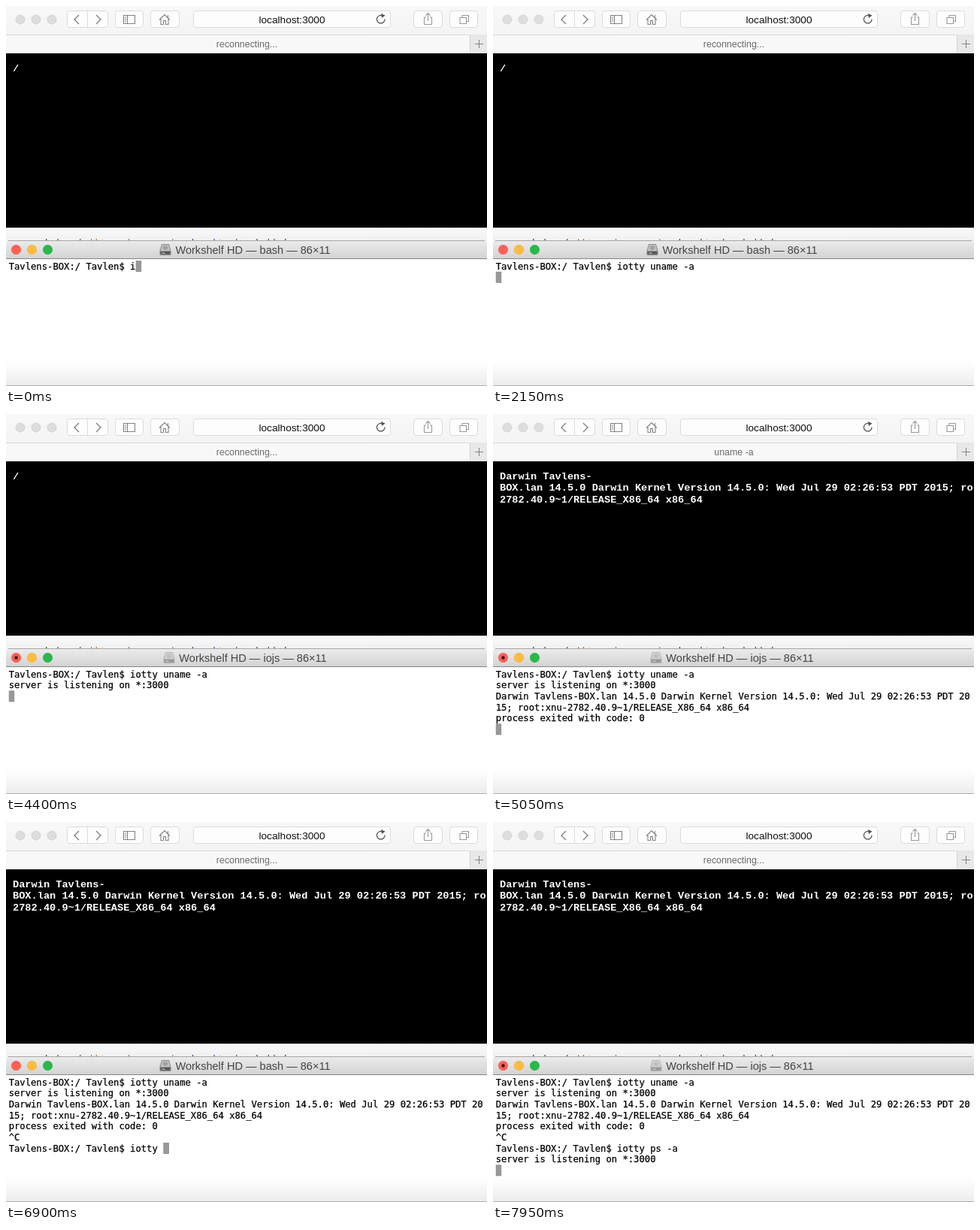
These frames come from a looping animation (640x506 px, 8000 ms). An HTML page:

```html
<!DOCTYPE html>
<html lang="en">
<head>
<meta charset="utf-8">
<title>Terminal in the browser</title>
<style>
html, body { margin: 0; width: 100%; height: 100%; overflow: hidden; background: #fff; }
svg { display: block; width: 640px; height: 506px; }
text { white-space: pre; font-family: "Liberation Sans", Arial, sans-serif; }
.shell text { font: 12.2px "DejaVu Sans Mono", Menlo, monospace; fill: #000; stroke: #000; stroke-width: .25; }
.page text { font: bold 13.64px "Liberation Mono", Courier, monospace; fill: #fff; }
.code text { font: 12px "DejaVu Sans Mono", Menlo, monospace; }
.btn rect { fill: #fdfdfd; stroke: #dcdcdc; }
.line { fill: none; stroke: #828282; stroke-width: 1.1; }
.pale { stroke: #999; }
.dark { stroke: #555; stroke-width: 1.3; }
</style>
</head>
<body>
<svg viewBox="0 0 640 506">
  <defs>
    <linearGradient id="bar" x2="0" y2="1"><stop stop-color="#f8f8f8"/><stop offset="1" stop-color="#f4f4f4"/></linearGradient>
    <linearGradient id="head" x2="0" y2="1"><stop stop-color="#ececec"/><stop offset="1" stop-color="#d2d2d2"/></linearGradient>
    <linearGradient id="strip" x2="0" y2="1"><stop stop-color="#f9f9f9"/><stop offset="1" stop-color="#f0f0f0"/></linearGradient>
    <linearGradient id="foot" x2="0" y2="1"><stop stop-color="#fff"/><stop offset="1" stop-color="#ededed"/></linearGradient>
    <clipPath id="peek"><rect x="0" y="310" width="640" height="2"/></clipPath>
  </defs>

  <!-- browser toolbar -->
  <rect width="640" height="38" fill="url(#bar)"/>
  <g fill="#dedede" stroke="#d3d3d3">
    <circle cx="19" cy="18" r="6"/><circle cx="40" cy="18" r="6"/><circle cx="61" cy="18" r="6"/>
  </g>
  <g class="btn">
    <rect x="81.500" y="6.500" width="54" height="22" rx="3.500"/>
    <rect x="145.500" y="6.500" width="37" height="22" rx="3.500"/>
    <rect x="192.500" y="6.500" width="38" height="22" rx="3.500"/>
    <rect x="249.500" y="6.500" width="262" height="22" rx="3.500"/>
    <rect x="542.500" y="6.500" width="38" height="22" rx="3.500"/>
    <rect x="590.500" y="6.500" width="37" height="22" rx="3.500"/>
  </g>
  <path d="M108.500 7V28" stroke="#dcdcdc"/>
  <g class="line">
    <path d="M97 12L91 18L97 24M120 12L126 18L120 24" stroke-width="1.400"/>
    <path d="M156.500 12.500H171.500V23.500H156.500ZM161.500 12.500V23.500M158 15H160M158 17.500H160M158 20H160"/>
    <path d="M204 18.500L211 11.500L218 18.500M206 17V24.500H209.500V19.500H212.500V24.500H216V17M215.500 12V15.500"/>
    <path class="dark" d="M500.500 12.700A5.300 5.300 0 1 0 504 17.500"/>
    <path class="pale" d="M559 15H556.500V24.500H566.500V15H564M561.500 20V9.500M558.500 12.500L561.500 9.500L564.500 12.500"/>
    <path class="pale" d="M607 15V12.500H615.500V20.500H612.500M604 15.500H612.500V23.500H604Z"/>
  </g>
  <path d="M499 10L504.500 12.500L500 16Z" fill="#555"/>
  <text x="380.500" y="23" font-size="13.650" text-anchor="middle" fill="#111">localhost:3000</text>

  <!-- tab bar -->
  <rect y="38" width="640" height="25" fill="#f8f8f8"/>
  <rect y="38" width="640" height="1" fill="#d8d8d8"/>
  <rect x="617" y="38" width="23" height="25" fill="#e8e8e8"/>
  <path d="M617.500 38V63" stroke="#d3d3d3"/>
  <path class="line" d="M624 50.500H635M629.500 45V56"/>
  <text id="tab" x="320.500" y="55" font-size="12.400" text-anchor="middle" fill="#686868"></text>

  <!-- page -->
  <rect y="63" width="640" height="232" fill="#000"/>
  <g class="page" id="page"></g>

  <!-- window peeking out behind -->
  <rect y="295" width="640" height="18" fill="url(#strip)"/>
  <rect y="295" width="640" height="1" fill="#c8c8c8"/>
  <g class="code" clip-path="url(#peek)">
    <text x="30" y="319" fill="#333">socket.on(</text>
    <text x="110" y="319" fill="#a0642d">'timeout, error'</text>
    <text x="245" y="319" fill="#2525c0">function</text>
    <text x="303" y="319" fill="#333">(socket) {</text>
  </g>

  <!-- terminal window -->
  <path d="M0 337V316Q0 312 4 312H636Q640 312 640 316V337Z" fill="url(#head)"/>
  <path d="M3 312.500H637" stroke="#a6a6a6"/>
  <rect y="336" width="640" height="1" fill="#858585"/>
  <circle cx="13.500" cy="324.500" r="6.200" fill="#fc6157" stroke="#ee544b" stroke-width=".6"/>
  <circle cx="34.500" cy="324.500" r="6.200" fill="#fdbd3e" stroke="#eeae38" stroke-width=".6"/>
  <circle cx="55.500" cy="324.500" r="6.200" fill="#29b84a" stroke="#27ab43" stroke-width=".6"/>
  <circle id="busy" cx="13.500" cy="324.500" r="2.200" fill="#4a0603"/>
  <g id="disk">
    <path d="M2.500 0H12.500L15 9V13.500Q15 15 13.500 15H1.500Q0 15 0 13.500V9Z" fill="#8b8b8b"/>
    <path d="M3.200 1H11.800L13.800 9H1.200Z" fill="#c4c4c4"/>
    <ellipse cx="7.500" cy="5" rx="3.500" ry="3" fill="#a2a2a2"/>
    <path d="M1 10H14V13.500H1Z" fill="#555"/>
    <path d="M3 12H7" stroke="#ddd"/>
  </g>
  <text id="title" x="328.500" y="329.500" font-size="14.550" text-anchor="middle" fill="#444"></text>
  <rect y="337" width="640" height="169" fill="#fff"/>
  <rect y="474" width="640" height="31" fill="url(#foot)"/>
  <rect y="505" width="640" height="1" fill="#b0b0b0"/>
  <rect id="cursor" width="6.600" height="14" fill="#989898" stroke="#858585" stroke-width=".8"/>
  <g class="shell" id="shell"></g>
</svg>
<script>
const LOOP = 8000;
const CELL = 7.345, ROW = 14.68;
const $ = id => document.getElementById(id);

const PROMPT = 'Tavlens-BOX:/ Tavlen$ ';
const KERNEL = '14.5.0 Darwin Kernel Version 14.5.0: Wed Jul 29 02:26:53 PDT 20';
const BUILD = '2782.40.9~1/RELEASE_X86_64 x86_64';
const LISTEN = 'server is listening on *:3000';

// moments at which each key lands
const FIRST = { text: 'iotty uname -a', keys: [0, 150, 250, 350, 500, 600, 1100, 1150, 1250, 1300, 1400, 1600, 1750, 1850] };
const SECOND = { text: 'iotty ps -a', keys: [6100, 6200, 6350, 6450, 6600, 6750, 7000, 7100, 7200, 7300, 7400] };

const OUTPUT = [
  [2300, LISTEN],
  [4500, 'Darwin Tavlens-BOX.lan ' + KERNEL],
  [4500, '15; root:xnu-' + BUILD],
  [4500, 'process exited with code: 0'],
  [5500, '^C']
];
const PAGE = ['Darwin Tavlens-', 'BOX.lan ' + KERNEL + '15; ro', BUILD];

const typed = (cmd, t) => PROMPT + cmd.text.slice(0, cmd.keys.filter(k => k <= t).length);
const within = (t, from, to) => t >= from && t < to;

function makeRows(parent, count, x, y, step) {
  return Array.from({ length: count }, (_, i) => {
    const row = document.createElementNS('http://www.w3.org/2000/svg', 'text');
    row.setAttribute('x', x);
    row.setAttribute('y', y + i * step);
    parent.append(row);
    return row;
  });
}
const shellRows = makeRows($('shell'), 9, 3.7, 350.7, ROW);
const pageRows = makeRows($('page'), 3, 9, 86.7, 15.7);

function setText(node, text) {
  if (node.textContent !== text) node.textContent = text;
}

function shellLines(t) {
  const lines = [typed(FIRST, t)];
  if (t >= 2050) lines.push('');
  for (const [at, text] of OUTPUT) {
    if (t >= at) lines.splice(-1, 1, text, '');
  }
  if (t >= 5550) lines[lines.length - 1] = typed(SECOND, t);
  if (t >= 7500) lines.push('');
  if (t >= 7600) lines.splice(-1, 1, LISTEN, '');
  return lines;
}

function draw(t) {
  const lines = shellLines(t);
  shellRows.forEach((row, i) => setText(row, lines[i] || ''));
  const last = lines.length - 1;
  $('cursor').setAttribute('x', 4.2 + lines[last].length * CELL);
  $('cursor').setAttribute('y', 339.5 + last * ROW);

  const busy = within(t, 2250, 5600) || t >= 7600;
  setText($('title'), `Workshelf HD — ${busy ? 'iojs' : 'bash'} — 86×11`);
  $('busy').style.display = busy ? '' : 'none';
  $('disk').setAttribute('transform', `translate(${busy ? 209.5 : 204.5} 317)`);
  $('disk').setAttribute('opacity', busy ? 0.5 : 1);

  setText($('tab'), within(t, 4500, 5600) ? 'uname -a' : 'reconnecting...');
  const page = t >= 4500 ? PAGE : ['/'];
  pageRows.forEach((row, i) => setText(row, page[i] || ''));
}

function tick() {
  draw(performance.now() % LOOP);
  requestAnimationFrame(tick);
}
tick();
</script>
</body>
</html>
```
